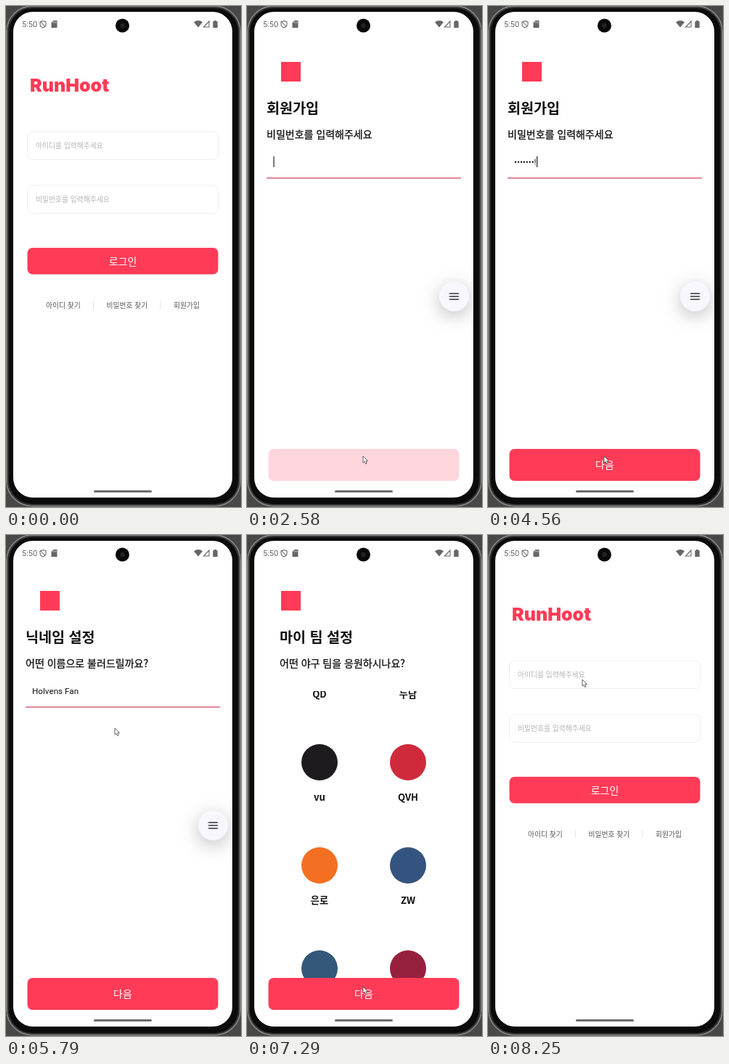
Recreate the animation shown at these times as an HTML page. Size 324 by 690 pixels, loop 8.28 s.

```html
<!DOCTYPE html>
<html lang="ko">
<head>
<meta charset="utf-8">
<title>Sign-up flow</title>
<style>
  html, body { margin: 0; width: 100%; height: 100%; overflow: hidden; background: #484848; }
  svg { display: block; width: 324px; height: 690px; }
  text { font: 14px "Noto Sans CJK KR", "Noto Sans CJK", sans-serif; fill: #111; white-space: pre; }
  .title { font-size: 19.6px; font-weight: 700; }
  .ask { stroke: #111; stroke-width: .3; }
  .mid { text-anchor: middle; }
  .hello { font-size: 17.6px; font-weight: 700; }
  .cheer { font-size: 13.5px; }
  .small { font-size: 9.8px; fill: #555; }
  .hint { font-size: 9.8px; fill: #b4b4b4; }
  .brand { font: 900 25px Inter, sans-serif; fill: #ff3b57; }
  .clock { font: 11px Roboto, sans-serif; fill: #666; }
  .entry { font: 11.7px Roboto, sans-serif; }
  .team { font-size: 13.2px; font-weight: 700; text-anchor: middle; }
  .red { fill: #ff3b57; }
  .btn text { fill: #fff; text-anchor: middle; }
  .off .red { fill: #ffd6dd; }
  .off text { opacity: 0; }
  .box { fill: #fff; stroke: #eee; }
  .icon { fill: none; stroke: #333; stroke-width: 1.5; stroke-linecap: round; stroke-linejoin: round; }
  .float { filter: drop-shadow(0 6px 13px rgba(0, 0, 0, .26)); }

  .play { animation: 8280ms linear infinite; }
  #password { animation-name: password; }
  #nickname { animation-name: nickname; }
  #teams { animation-name: teams; }
  #welcome { animation-name: welcome; }
  #login { animation-name: login; }
  #pill { animation-name: pill; }
  #bubble { animation-name: bubble; }
  #list { animation-name: list; animation-timing-function: ease-out; }
  #start { animation-name: press; }
  #pointer { animation-name: pointer; animation-timing-function: ease-in-out; }
  #arrow { animation-name: appear; animation-timing-function: step-end; }

  @keyframes password { 0%, 29% { opacity: 0 } 30.4%, 100% { opacity: 1 } }
  @keyframes nickname { 0%, 55.8% { opacity: 0 } 57.2%, 100% { opacity: 1 } }
  @keyframes teams { 0%, 74.6% { opacity: 0 } 76%, 100% { opacity: 1 } }
  @keyframes welcome { 0%, 88.8% { opacity: 0 } 90.2%, 100% { opacity: 1 } }
  @keyframes login { 0%, 5.8% { opacity: 1 } 7.2%, 96.7% { opacity: 0 } 98.2%, 100% { opacity: 1 } }
  @keyframes pill { 0%, 11.6% { opacity: 0 } 12.6%, 18% { opacity: 1 } 18.6%, 100% { opacity: 0 } }
  @keyframes bubble {
    0%, 18% { opacity: 0; transform: translate(28px, 419px) }
    18.6% { opacity: 1; transform: translate(28px, 419px) }
    21.5%, 100% { opacity: 1; transform: translate(285.5px, 400px) }
  }
  @keyframes list { 0%, 77.3% { transform: none } 79.3%, 100% { transform: translateY(-89px) } }
  @keyframes press { 0%, 94% { opacity: 1 } 94.5%, 100% { opacity: .55 } }
  @keyframes appear { 0% { opacity: 0 } .36%, 100% { opacity: 1 } }
  @keyframes pointer {
    0% { transform: translate(130px, 199px) }
    4.8%, 6.3% { transform: translate(249px, 410px) }
    11.6%, 15.7% { transform: translate(100px, 222px) }
    27.2%, 56.8% { transform: translate(160px, 620px) }
    62.3%, 70.7% { transform: translate(150px, 266px) }
    73.6%, 75.4% { transform: translate(160px, 620px) }
    77.3% { transform: translate(190px, 386px) }
    79.3%, 80.4% { transform: translate(190px, 297px) }
    82.6%, 84.1% { transform: translate(216px, 312px) }
    87.7%, 89.4% { transform: translate(160px, 622px) }
    93%, 97.1% { transform: translate(186px, 581px) }
    99.3%, 100% { transform: translate(130px, 199px) }
  }
</style>
</head>
<body>
<svg viewBox="0 0 324 690">
  <defs>
    <g id="page">
      <rect width="324" height="690" fill="#fff"/>
      <rect class="red" x="47" y="77" width="27" height="27"/>
    </g>
    <rect id="bar" x="29.5" y="610" width="263" height="44" rx="7"/>
    <rect id="line" x="27" y="236.2" width="268" height="1.5" fill="#d9607a"/>
    <rect id="caret" y="207" width="1.2" height="15" fill="#222"/>
    <path id="menu" class="icon" d="M-6-4H6M-6 0H6M-6 4H6"/>
    <clipPath id="window"><rect y="215" width="324" height="395"/></clipPath>
  </defs>

  <g id="account">
    <use href="#page"/>
    <text class="title" x="27" y="148">회원가입</text>
    <text class="ask" x="27" y="182">사용할 아이디를 입력해주세요</text>
    <text class="entry" x="36" y="218.5"></text>
    <use class="caret" href="#caret"/>
    <use href="#line"/>
    <g class="btn"><use class="red" href="#bar"/><text x="161" y="637">다음</text></g>
  </g>

  <g id="password" class="play">
    <use href="#page"/>
    <text class="title" x="27" y="148">회원가입</text>
    <text class="ask" x="27" y="182">비밀번호를 입력해주세요</text>
    <text class="entry" x="36" y="218.5"></text>
    <use class="caret" href="#caret"/>
    <use href="#line"/>
    <g class="btn"><use class="red" href="#bar"/><text x="161" y="637">다음</text></g>
  </g>

  <g id="nickname" class="play">
    <use href="#page"/>
    <text class="title" x="27" y="148">닉네임 설정</text>
    <text class="ask" x="27" y="182">어떤 이름으로 불러드릴까요?</text>
    <text class="entry" x="36" y="218.5"></text>
    <use class="caret" href="#caret"/>
    <use href="#line"/>
    <g class="btn"><use class="red" href="#bar"/><text x="161" y="637">다음</text></g>
  </g>

  <g id="pill" class="play">
    <rect class="float" x="11" y="269" width="35" height="168" rx="17.5" fill="#f8f6fe"/>
    <g transform="translate(28 287)">
      <rect x="-2.2" y="-6.5" width="4.4" height="8.5" rx="2.2" fill="#333"/>
      <path class="icon" d="M-4.6-.5a4.6 4.6 0 0 0 9.2 0M0 4.2V6.5"/>
    </g>
    <path class="icon" d="M20 320L24.5 314.5H35.5V325.5H24.5ZM27.5 317.5L32.5 322.5M32.5 317.5L27.5 322.5"/>
    <circle cx="28" cy="353" r="14" fill="#5b74ae"/>
    <path class="icon" style="stroke:#fff" d="M22.5 353.5L26.3 357.2L34 349.2"/>
    <circle class="icon" cx="28" cy="386" r="5.8"/>
    <path class="icon" d="M26 384.2v.2M30 384.2v.2M25.2 387.5q2.8 3.2 5.6 0"/>
    <use href="#menu" x="28" y="419"/>
  </g>
  <g id="bubble" class="play">
    <circle class="float" r="20.5" fill="#f9f7fe"/>
    <use href="#menu"/>
  </g>

  <g id="teams" class="play">
    <use href="#page"/>
    <text class="title" x="45" y="148">마이 팀 설정</text>
    <text class="ask" x="45" y="182">어떤 야구 팀을 응원하시나요?</text>
    <g clip-path="url(#window)"><g id="list" class="play"></g></g>
    <g class="btn"><use class="red" href="#bar"/><text x="161" y="637">다음</text></g>
  </g>

  <g id="welcome" class="play">
    <use href="#page"/>
    <g fill="none" stroke-linecap="round">
      <path d="M152 175L175 201L138 213Z" fill="#ff3b57" stroke="#ff3b57" stroke-width="6" stroke-linejoin="round"/>
      <path d="M152 174Q170 174 176 200Q159 195 152 174Z" fill="#a92c42"/>
      <path d="M157 181q3-6-1-12M163 187q5-3 3-9t5-9M164 194q7-3 10 0t9-1" stroke="#5b7cb6" stroke-width="3.4"/>
      <path d="M174 188q3-7 14-7" stroke="#ee3f58" stroke-width="3.4"/>
    </g>
    <g fill="#b9bfcb">
      <circle cx="147" cy="166" r="2.2"/><circle cx="137" cy="184" r="2.2"/>
      <circle cx="183" cy="203" r="2.4"/><circle cx="181" cy="174" r="1.8" fill="#e5a8b0"/>
      <circle cx="167" cy="212" r="2" fill="#e5c3b8"/>
      <rect x="164" y="163" width="5" height="5" fill="#536a99" transform="rotate(20 166 165)"/>
      <rect x="149" y="186" width="5" height="5" fill="#fff"/>
    </g>
    <text class="hello mid" x="160.5" y="269">환영합니다!</text>
    <text class="cheer mid" x="160.5" y="300">당신의 열정을 보여주세요!</text>
    <g id="start" class="btn play"><use class="red" href="#bar"/><text x="161" y="637">시작하기</text></g>
  </g>

  <g id="login" class="play">
    <rect width="324" height="690" fill="#fff"/>
    <text class="brand" x="33" y="118">RunHoot</text>
    <rect class="box" x="29.5" y="173" width="263" height="38.5" rx="7"/>
    <text class="hint" x="41" y="196">아이디를 입력해주세요</text>
    <rect class="box" x="29.5" y="247" width="263" height="38.5" rx="7"/>
    <text class="hint" x="41" y="270">비밀번호를 입력해주세요</text>
    <g class="btn">
      <rect class="red" x="29.5" y="333" width="263" height="36.5" rx="7"/>
      <text x="161" y="356.5">로그인</text>
    </g>
    <text class="small" x="55" y="415.5">아이디 찾기</text>
    <text class="small" x="138.5" y="415.5">비밀번호 찾기</text>
    <text class="small" x="231" y="415.5">회원가입</text>
    <path d="M120.5 406V417M213 406V417" stroke="#e2e2e2"/>
  </g>

  <g id="status" fill="#666">
    <text class="clock" x="22" y="29">5:50</text>
    <path d="M51 20.5l4 1.5v3q0 3.4-4 5q-4-1.6-4-5v-3ZM48 22l6 6.5" fill="none" stroke="#666" stroke-width="1.1"/>
    <path d="M65.5 20H70.5V30H62.5V23Z"/>
    <path d="M65 21.5v2M67 21.5v2M69 21.5v2" stroke="#fff" stroke-width=".7"/>
    <path d="M259 22.3Q265 17.8 271 22.3L265 29.6Z"/>
    <path d="M272.5 29H280V21Z" fill="none" stroke="#666" stroke-width="1.1"/>
    <path d="M285.3 21.2H287V20H290V21.2H291.7V30H285.3Z"/>
  </g>
  <circle cx="160.5" cy="27" r="9.5" fill="#080808"/>
  <circle cx="160.5" cy="27" r="3.4" fill="#1d2323"/>
  <rect x="121" y="667" width="80" height="3" rx="1.5" fill="#6c6c6c"/>

  <g fill-rule="evenodd">
    <path fill="#484848" d="M0 0H324V690H0ZM36 4H288a30 30 0 0 1 30 30V652a30 30 0 0 1-30 30H36a30 30 0 0 1-30-30V34a30 30 0 0 1 30-30Z"/>
    <path fill="#0b0b0b" d="M36 0H288a36 36 0 0 1 36 36V653a36 36 0 0 1-36 36H36a36 36 0 0 1-36-36V36a36 36 0 0 1 36-36ZM37 8H285a27 27 0 0 1 27 27V650a27 27 0 0 1-27 27H37a27 27 0 0 1-27-27V35a27 27 0 0 1 27-27Z"/>
  </g>
  <g fill="none">
    <rect x="1" y=".3" width="322" height="688.4" rx="35" stroke="#878787" stroke-width="1.8"/>
    <rect x="3" y="2.2" width="318" height="684.6" rx="33" stroke="#3b3b3b" stroke-width="1.6"/>
  </g>

  <g id="pointer" class="play">
    <path id="arrow" class="play" d="M0 0V9.2L2.1 7.3L3.6 10.6L5.2 9.9L3.8 6.7H6.6Z" fill="#fff" stroke="#555" stroke-width=".9"/>
  </g>
</svg>
<script>
  const LOOP = 8280, BLINK = 960, BLINK_START = 1875, REVEAL = 180;
  const inputs = [
    { id: 'account', text: 'easyrun1', start: 1170, step: 110, min: 1 },
    { id: 'password', text: 'run1234!', start: 3070, step: 200, min: 8, masked: true },
    { id: 'nickname', text: 'Holvens Fan', start: 5200, step: 50, min: 1 }
  ];
  for (const input of inputs) {
    const page = document.getElementById(input.id);
    input.entry = page.querySelector('.entry');
    input.caret = page.querySelector('.caret');
    input.button = page.querySelector('.btn');
  }

  const ROW_GAP = 142, COLUMN_GAP = 122;
  const rows = [
    [['QD', '#b3264a'], ['누담', '#2a2d55']],
    [['vu', '#1d1b1d'], ['QVH', '#cf2a3c']],
    [['은로', '#f36f21'], ['ZW', '#34547f']],
    [['', '#33587a'], ['', '#98203f']]
  ];
  const teamCell = ([name, color], x, y) =>
    `<circle cx="${x}" cy="${y}" r="25" fill="${color}"/>` +
    `<text class="team" x="${x}" y="${y + 53}">${name}</text>`;
  document.getElementById('list').innerHTML = rows.flatMap((row, r) =>
    row.map((team, c) => teamCell(team, 100 + COLUMN_GAP * c, 260 + ROW_GAP * r))).join('');

  function type(input, t) {
    const { text, start, step, min, masked, entry, caret, button } = input;
    const typed = Math.floor((t - start) / step) + 1;
    const count = Math.max(0, Math.min(text.length, typed));
    let shown = text.slice(0, count);
    if (masked && count) {
      // The newest character stays readable for a moment.
      const age = t - start - (count - 1) * step;
      const last = age < REVEAL ? shown[count - 1] : '•';
      shown = '•'.repeat(count - 1) + last;
    }
    if (entry.textContent !== shown) entry.textContent = shown;
    caret.setAttribute('x', 36.4 + (shown ? entry.getComputedTextLength() : 0));
    caret.style.opacity = (t + LOOP - BLINK_START) % BLINK < BLINK / 2 ? 1 : 0;
    button.classList.toggle('off', count < min);
  }

  // Keeps the blink phase independent of the loop length.
  let origin;
  function draw(now) {
    origin ??= now;
    const t = (now - origin) % LOOP;
    inputs.forEach(input => type(input, t));
    requestAnimationFrame(draw);
  }
  requestAnimationFrame(draw);
</script>
</body>
</html>
```
